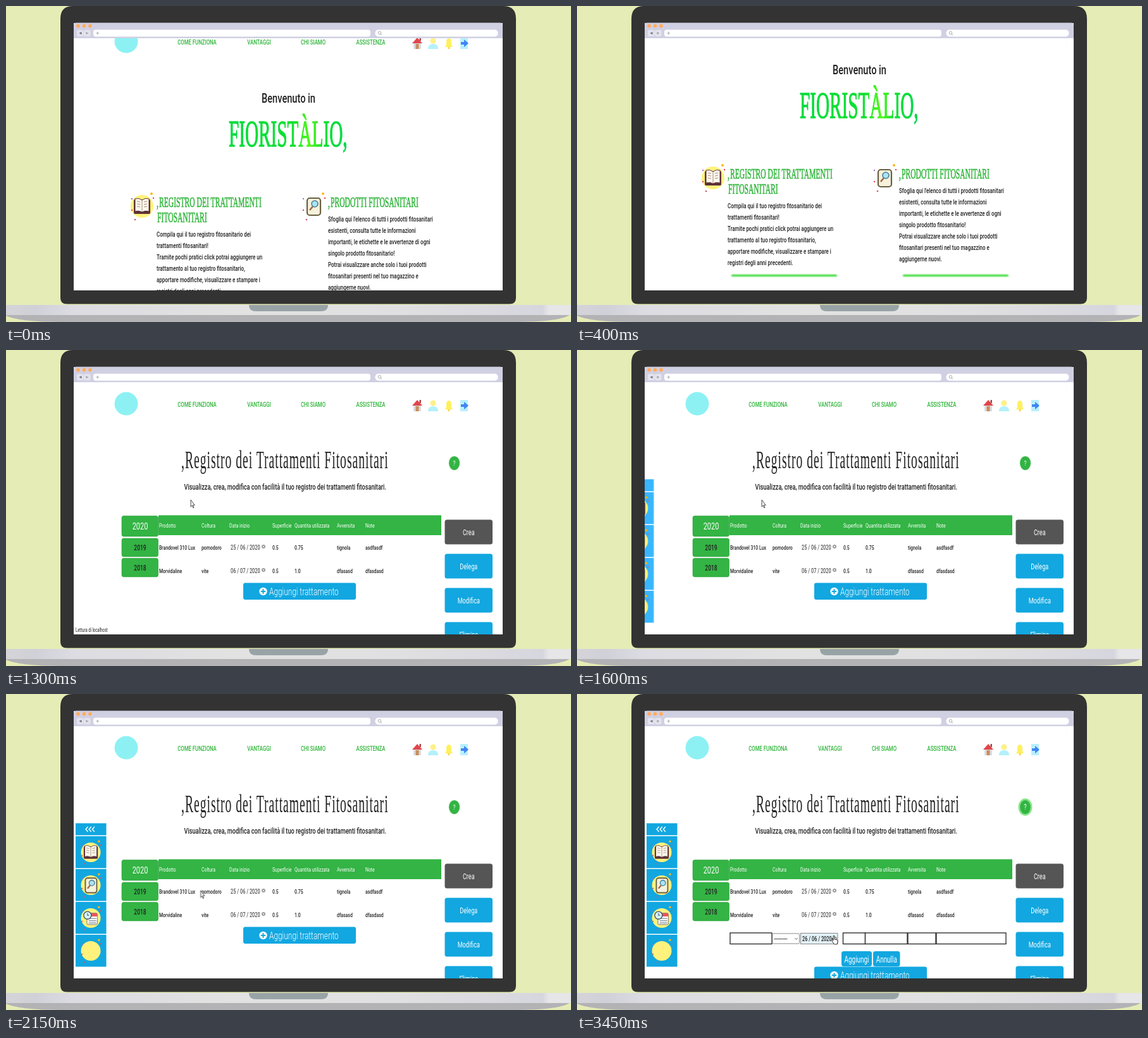
Animation, 893 px wide and 500 px high, one loop 3.85 s. Source, as an HTML page:

```html
<!DOCTYPE html>
<html lang="it">
<head>
<meta charset="utf-8">
<title>Registro dei trattamenti</title>
<style>
html, body { margin: 0; width: 100%; height: 100%; overflow: hidden; background: #e6ecb5; }
svg { display: block; width: 100%; height: 100%; }
text { font-family: Roboto, "Open Sans", sans-serif; fill: #222; }
.serif { font-family: "Liberation Serif", serif; }
.mid { text-anchor: middle; }
.med { font-weight: 500; }
.light { font-weight: 300; }
.green { fill: #2fb53a; }
.serif.green { stroke: #2fb53a; stroke-width: .7; }
.white { fill: #fff; }
.grey { fill: #555; }
.logo { fill: url(#lime); stroke: url(#lime); stroke-width: 1.4; }

#home, #register, #scroll, #status, #side, #sideFill, #chev, #add, #form, #date,
#help, #ring, #pointer, #arrow, #hand { animation: 3.85s step-end infinite; }

#scroll { animation-name: scroll; }
@keyframes scroll {
  0% { transform: translateY(-29px); }
  2.59% { transform: translateY(-29px); animation-timing-function: steps(6); }
  10.38% { transform: translateY(-74px); animation-timing-function: steps(3); }
  14.28% { transform: translateY(-89px); animation-timing-function: steps(4); }
  19.48%, 100% { transform: translateY(-96px); }
}
#home { animation-name: home; }
@keyframes home { 0% { opacity: 1; } 32.46%, 100% { opacity: 0; } }
#register { animation-name: register; }
@keyframes register { 0% { opacity: 0; } 32.46%, 100% { opacity: 1; } }
#status { animation-name: status; }
@keyframes status { 0% { opacity: 0; } 29.87% { opacity: 1; } 36.36%, 100% { opacity: 0; } }

#side { animation-name: slide; }
@keyframes slide {
  0% { transform: translateX(-54px); }
  38.96% { transform: translateX(-54px); animation-timing-function: steps(3); }
  42.85% { transform: translateX(-29px); animation-timing-function: steps(4); }
  48.05% { transform: translateX(-9px); animation-timing-function: steps(3); }
  51.94%, 100% { transform: translateX(0); }
}
#sideFill { animation-name: sideFill; }
@keyframes sideFill {
  0% { fill: #38b6ff; }
  50.64% { fill: #38b6ff; animation-timing-function: steps(3); }
  54.54%, 100% { fill: #12a7e0; }
}
#chev { animation-name: chev; }
@keyframes chev { 0% { opacity: 0; } 53.24%, 100% { opacity: 1; } }

#add { animation-name: add; }
@keyframes add {
  0% { color: #12a7e0; transform: translateY(0); }
  62.33% { color: #2440ff; transform: translateY(0); }
  79.22%, 100% { color: #12a7e0; transform: translateY(63px); }
}
#form { animation-name: form; }
@keyframes form { 0% { opacity: 0; } 79.22%, 100% { opacity: 1; } }
#date { animation-name: date; }
@keyframes date { 0% { fill: #fff; } 85.71%, 100% { fill: #e2f1f8; } }

#help { animation-name: grow; transform-box: fill-box; transform-origin: center; }
@keyframes grow {
  0% { transform: scale(1); }
  80.51% { transform: scale(1); animation-timing-function: steps(7); }
  89.61%, 100% { transform: scale(1.12); }
}
#ring { animation-name: ring; }
@keyframes ring {
  0% { stroke-opacity: 0; }
  80.51% { stroke-opacity: 0; animation-timing-function: steps(7); }
  89.61%, 100% { stroke-opacity: 1; }
}

#pointer { animation-name: move; }
@keyframes move {
  0% { transform: translate(300px, 292px); }
  18.18% { transform: translate(300px, 292px); animation-timing-function: steps(3); }
  22.07% { transform: translate(292px, 214px); }
  23.37% { transform: translate(292px, 214px); animation-timing-function: steps(6); }
  31.16% { transform: translate(292px, 237px); }
  42.85% { transform: translate(292px, 237px); animation-timing-function: steps(4); }
  48.05% { transform: translate(258px, 250px); animation-timing-function: steps(2); }
  50.64% { transform: translate(252px, 262px); animation-timing-function: steps(10); }
  63.63% { transform: translate(391px, 384px); }
  79.22% { transform: translate(391px, 384px); animation-timing-function: steps(7); }
  88.31%, 100% { transform: translate(405px, 382px); }
}
#arrow { animation-name: arrow; }
@keyframes arrow { 0% { opacity: 0; } 18.18% { opacity: 1; } 62.33%, 100% { opacity: 0; } }
#hand { animation-name: hand; }
@keyframes hand { 0% { opacity: 0; } 62.33%, 100% { opacity: 1; } }
</style>
</head>
<body>
<svg id="stage" viewBox="0 0 893 500" preserveAspectRatio="none"></svg>
<script>
const NARROW = { sans: 0.71, serif: 0.5 };

const text = (x, y, size, str, cls = '', extra = '') => {
  const k = cls.includes('serif') ? NARROW.serif : NARROW.sans;
  return `<text transform="translate(${x} ${y}) scale(${k} 1)" font-size="${size}" class="${cls}" ${extra}>${str}</text>`;
};
const rect = (x, y, w, h, fill, r = 0, extra = '') =>
  `<rect x="${x}" y="${y}" width="${w}" height="${h}" rx="${r}" ${fill ? `fill="${fill}"` : ''} ${extra}/>`;
const dot = (x, y, r, fill, extra = '') => `<circle cx="${x}" cy="${y}" r="${r}" fill="${fill}" ${extra}/>`;
const path = (d, fill, stroke = 'none', w = 1) =>
  `<path d="${d}" fill="${fill}" stroke="${stroke}" stroke-width="${w}"/>`;
const at = (x, y, body, s = 1) => `<g transform="translate(${x} ${y}) scale(${s})">${body}</g>`;

const GREEN = '#33b444', BLUE = '#12a7e0';

// icons, centred on 0,0
const sparks = dot(15, -20, 2, '#fdb813') + dot(18, -13, 1.2, '#e8474c') + dot(-16, -12, 1.2, '#b06ad0')
  + dot(-16, 6, 1.2, '#e8474c') + dot(-11, 21, 1.3, '#d0507a');
const disc = dot(0, 0, 18, '#fff27c');
const book = rect(-13, -11, 26, 23, '#5d3038', 2)
  + path('M-11-12Q-5-14 0-10Q5-14 11-12V8Q5 6 0 9Q-5 6-11 8Z', '#fff8ec', '#5d3038')
  + path('M0-10V9M-8-8l5 1M-8-4l5 1M-8 0l5 1M8-8l-5 1M8-4l-5 1M8 0l-5 1', 'none', '#a08a80', 1);
const lens = rect(-10, -13, 21, 27, '#f6f1dc', 4, 'stroke="#6a6042" stroke-width="2.2"')
  + path('M-1 0L-6 6', 'none', '#a5673f', 2.6)
  + dot(2, -4, 5, '#a9e4f5', 'stroke="#4b7f96" stroke-width="1.6"');
const agenda = rect(-7, -9, 19, 21, '#fff', 2, 'stroke="#55606a"') + rect(-7, -9, 19, 6, '#e8575a', 2)
  + path('M-4 1H10M-4 5H10M-4 9H10', 'none', '#8a98a4', 1.6)
  + dot(-6, -5, 7, '#d9f2fb', 'stroke="#3f5a6b" stroke-width="1.6"') + path('M-6-9V-5H-3', 'none', '#3f5a6b', 1.2);

const house = path('M-6-1V9H6V-1Z', '#d9dde2') + rect(-2.5, 1, 5, 8, '#c98e5c')
  + path('M-8 0L0-9L8 0Z', '#e0474c') + rect(3.5, -9, 2.5, 5, '#a8484c');
const person = dot(0, -4, 4.6, '#fff08a') + path('M-8 9Q-8 1 0 1Q8 1 8 9Z', '#b4f0fc');
const bell = path('M-6 6Q-4 4-4-2Q-4-8 0-8Q4-8 4-2Q4 4 6 6Z', '#fff060') + dot(0, 7.5, 1.8, '#fbd84a');
const exit = rect(-6, -9, 12, 18, '#b9f0fb') + path('M-5-2H0V-6L7 0L0 6V2H-5Z', '#3f86f2');

const header = dot(190, 85, 18.5, '#8df1f4')
  + [[302, 'COME FUNZIONA'], [400, 'VANTAGGI'], [485.5, 'CHI SIAMO'], [576.5, 'ASSISTENZA']]
    .map(([x, s]) => text(x, 90, 11, s, 'mid med green')).join('')
  + at(650, 88, house) + at(675, 88, person) + at(700, 88, bell) + at(724, 88, exit);

const card = (x, y, icon, heads, lines) => {
  const top = y + heads.length * 24;
  return at(x, y, icon + sparks)
    + text(x + 23, y + 1, 23, ',', 'serif green')
    + heads.map((s, i) => text(x + (i ? 24 : 27), y + 0.5 + i * 24, 23.2, s, 'serif green')).join('')
    + lines.map((s, i) => text(x + 23, top + i * 18, 11.2, s, 'med')).join('')
    + (lines.length ? rect(x + 29, 499, 167, 3, '#35d92f', 1.5, 'filter="url(#soft)"') : '');
};

const home = header
  + text(446.5, 181.5, 20.6, 'Benvenuto in', 'mid med')
  + text(352, 251, 58.5, 'FIORISTÀLIO,', 'serif logo')
  + card(215, 346, disc + book, ['REGISTRO DEI TRATTAMENTI', 'FITOSANITARI'], [
    'Compila qui il tuo registro fitosanitario dei', 'trattamenti fitosanitari!',
    'Tramite pochi pratici click potrai aggiungere un', 'trattamento al tuo registro fitosanitario,',
    'apportare modifiche, visualizzare e stampare i', 'registri degli anni precedenti.'])
  + card(486, 346, lens, ['PRODOTTI FITOSANITARI'], [
    "Sfoglia qui l'elenco di tutti i prodotti fitosanitari", 'esistenti, consulta tutte le informazioni',
    'importanti, le etichette e le avvertenze di ogni', 'singolo prodotto fitosanitario!',
    'Potrai visualizzare anche solo i tuoi prodotti', 'fitosanitari presenti nel tuo magazzino e',
    'aggiungerne nuovi.'])
  + card(215, 561, agenda, ['SCADENZIARIO'], [])
  + card(486, 561, disc, ['TRACCIABILITÀ'], []);

const cols = [242, 309, 353, 421, 456, 523, 568];
const clear = (x, y) => dot(x, y, 3, '#999') + path(`M${x - 1.2} ${y - 1.2}l2.4 2.4m0-2.4l-2.4 2.4`, 'none', '#fff', 0.8);
const row = (y, cells) => cells.map((s, i) => i === 2
  ? text(355, y, 10.4, s, 'grey med') + clear(407, y - 4.5)
  : text(cols[i], y, 9.7, s, 'med')).join('');
const year = (y, h, s, size, cls) => rect(183, y, 57.5, h, GREEN, 3, 'stroke="#2a9a3a" stroke-width=".6"')
  + text(212, y + h / 2 + size * 0.36, size, s, 'mid ' + cls);
const button = (x, y, w, h, fill, s, size) => rect(x, y, w, h, fill, 3.5)
  + text(x + w / 2, y + h / 2 + size * 0.42, size, s, 'mid white');
const box = (x, w) => rect(x, 378, w, 17.5, '#fff', 0, 'stroke="#222" stroke-width="1.3"');

const table = rect(241, 261.5, 447, 31.5, GREEN)
  + ['Prodotto', 'Coltura', 'Data inizio', 'Superficie', 'Quantita utilizzata', 'Avversita', 'Note']
    .map((s, i) => text(cols[i], 281, 9.7, s, 'white')).join('')
  + year(262.5, 32.5, '2020', 15.5, 'white') + year(298, 29, '2019', 12, 'med') + year(329.5, 29.5, '2018', 12, 'med')
  + row(315.5, ['Brandovel 310 Lux', 'pomodoro', '25 / 06 / 2020', '0.5', '0.75', 'tignola', 'asdfasdf'])
  + row(352.5, ['Morvidaline', 'vite', '06 / 07 / 2020', '0.5', '1.0', 'dfasasd', 'dfasdasd']);

const form = box(242, 66) + box(420.5, 35) + box(455.5, 66.5) + box(523, 44) + box(568, 110)
  + rect(309, 379, 42.5, 16, '#fff', 1.5, 'stroke="#888"') + text(311.5, 390.5, 10, '---------', 'med')
  + path('M344.5 386l2 2.5l2-2.5', 'none', '#666', 1)
  + rect(353.5, 378.5, 58.5, 17, '', 0, 'id="date" stroke="#888"') + text(356, 390.8, 10.4, '26 / 06 / 2020', 'med')
  + clear(408, 387)
  + button(418, 407, 48, 24, BLUE, 'Aggiungi', 14) + button(468, 407, 42.5, 24, BLUE, 'Annulla', 14);

const add = rect(375, 368.5, 178, 26.5, 'currentColor', 3)
  + dot(406.5, 382, 6.2, '#fff') + path('M402.8 382h7.4M406.5 378.3v7.4', 'none', 'currentColor', 2)
  + text(416, 388.3, 16.7, 'Aggiungi trattamento', 'light white');

const help = `<ellipse id="ring" cx="708.5" cy="179" rx="8.6" ry="11" fill="${GREEN}" stroke="#86e686" stroke-width="2.4"/>`
  + text(708.5, 183, 11.5, '?', 'mid white');

const cells = [225, 277, 329, 381];
const icons = [book, lens, agenda, ''];
const chevron = x => path(`M${x + 3.5} 210l-3.5 4l3.5 4`, 'none', '#fff', 1.4);
const side = `<g id="sideFill">${rect(110, 204.5, 48.5, 19, '')}${cells.map(y => rect(110, y, 48.5, 50.5, '')).join('')}</g>`
  + chevron(126) + chevron(131.2) + `<g id="chev">${chevron(136.4)}</g>`
  + cells.map((y, i) => at(134, y + 25.5, disc + icons[i] + sparks, 0.86)).join('');

const register = rect(107, 51, 678, 399, '#fff') + header
  + text(277, 186.5, 39.2, ',Registro dei Trattamenti Fitosanitari', 'serif', 'letter-spacing="2"')
  + text(281.5, 221, 12.9, 'Visualizza, crea, modifica con facilità il tuo registro dei trattamenti fitosanitari.', 'med')
  + `<g id="help">${help}</g>` + table
  + [['Crea', '#555'], ['Delega', BLUE], ['Modifica', BLUE], ['Elimina', BLUE]]
    .map(([s, c], i) => button(693.5, 268.5 + i * 54, 75.5, 39, c, s, 12.8)).join('')
  + `<g id="form">${form}</g><g id="add">${add}</g><g id="side">${side}</g>`;

const pointer = `<g id="arrow">${path('M0 0V11.2L2.2 9L3.7 12.8L5 12.2L3.5 8.4H6.3Z', '#eee', '#444', 0.9)}</g>`
  + `<g id="hand">${path('M0 1Q1-.8 2 1V6L6 7Q7.6 7.6 7 10L6 14H1.6L-1.8 9Q-2-.4 0 8Z', '#fff', '#222', 0.9)}</g>`;

const laptop = path('M86 20Q86 0 106 0H786Q806 0 806 20V462Q806 471.5 796 471.5H96Q86 471.5 86 462Z', '#333')
  + rect(107, 27, 678, 423, '#fff')
  + path('M0 487H893Q880 500 800 500H90Q20 500 0 490Z', '#b3b3b6')
  + rect(0, 473, 893, 16, 'url(#base)')
  + path('M384 473H509Q509 483 498 483H395Q384 483 384 473Z', '#98a3a6');

const bar = path('M107 51V31Q107 26.5 111 26.5H781Q785 26.5 785 31V51Z', '#d0d0e3')
  + [114, 123.5, 133].map(x => dot(x, 31.5, 2.9, '#ffad5e')).join('')
  + rect(112, 38, 10.5, 10, '#e4e4ee', 2) + rect(123, 38, 10.5, 10, '#e4e4ee', 2)
  + path('M119.5 40.8V45.2L115.3 43Z', '#777') + path('M126.3 40.8V45.2L130.5 43Z', '#aaa')
  + rect(138, 37.5, 438, 11, '#fff', 4) + path('M142.2 43h5M144.7 40.5v5', 'none', '#aaa', 1)
  + rect(583.5, 37.5, 194, 11, '#fff', 5) + dot(590.5, 42.5, 2.2, 'none', 'stroke="#aaa"')
  + path('M592 44l2.2 2.2', 'none', '#aaa', 1);

document.getElementById('stage').innerHTML = `
  <defs>
    <clipPath id="view">${rect(107, 51, 678, 399, '#fff')}</clipPath>
    <filter id="soft" x="-5%" y="-200%" width="110%" height="500%"><feGaussianBlur stdDeviation="0.9"/></filter>
    <linearGradient id="lime">
      <stop offset="0" stop-color="#00dc3c"/><stop offset=".55" stop-color="#10e030"/>
      <stop offset=".68" stop-color="#50f818"/><stop offset=".8" stop-color="#10e030"/><stop offset="1" stop-color="#00d84c"/>
    </linearGradient>
    <linearGradient id="base">
      <stop offset="0" stop-color="#d4d4d8"/><stop offset=".05" stop-color="#d0d0d8"/><stop offset=".12" stop-color="#dcdce2"/>
      <stop offset=".4" stop-color="#e2e2e2"/><stop offset=".7" stop-color="#e0e0e2"/>
      <stop offset=".95" stop-color="#d6d6de"/><stop offset=".96" stop-color="#e6e6e8"/>
    </linearGradient>
  </defs>
  ${rect(0, 0, 893, 500, '#e6ecb5')}${laptop}
  <g clip-path="url(#view)">
    <g id="home"><g id="scroll">${home}</g></g>
    <g id="register">${register}</g>
    <g id="status">${text(110, 446, 8.4, 'Lettura di localhost')}</g>
    <g id="pointer">${pointer}</g>
  </g>
  ${bar}`;
</script>
</body>
</html>
```
